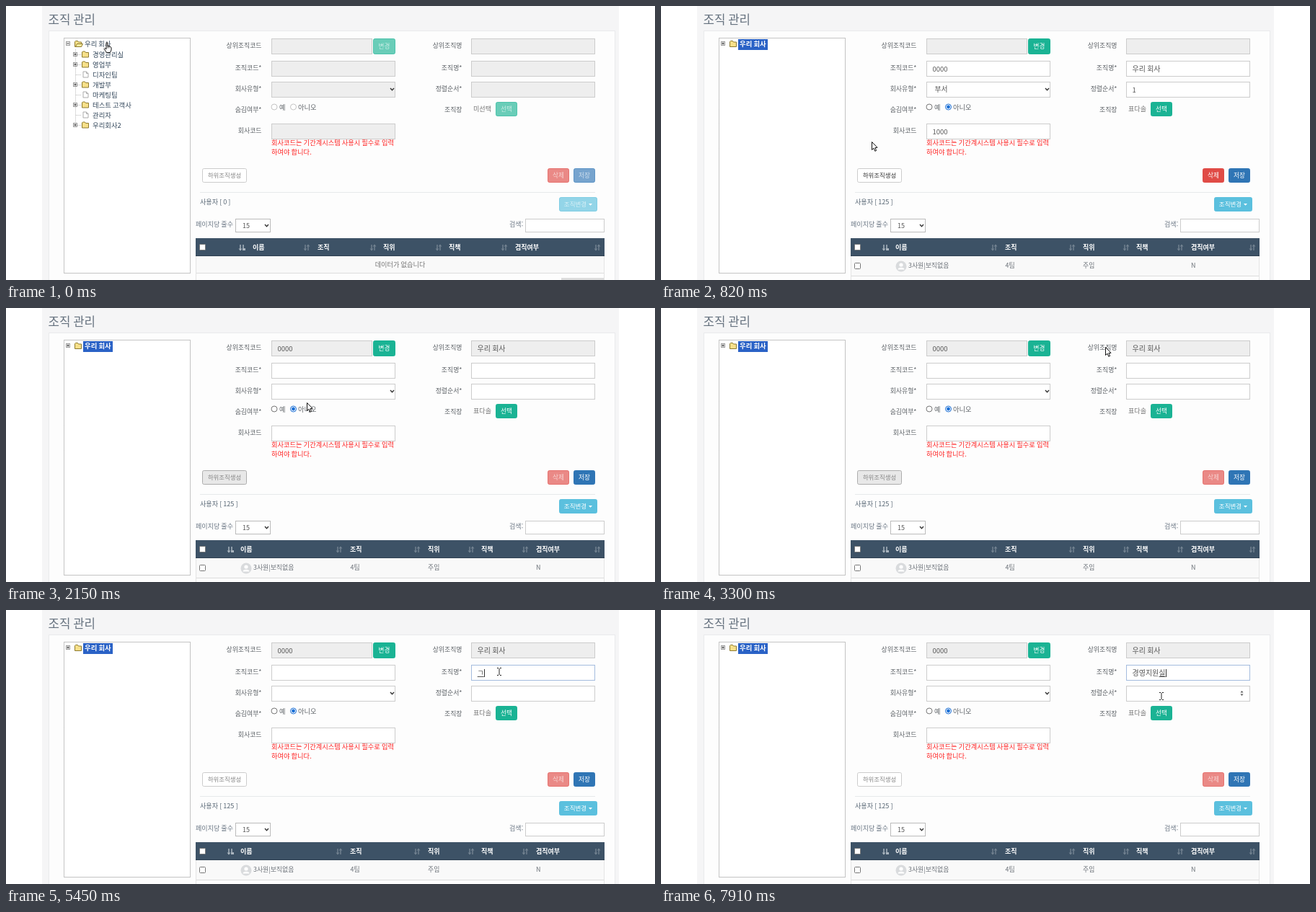
These frames come from a looping animation (900 px wide and 380 px high, 8000 ms). An HTML page with a canvas:

```html
<!DOCTYPE html>
<html lang="ko">
<head>
<meta charset="utf-8">
<title>조직 관리</title>
<style>
  html, body { margin: 0; width: 100%; height: 100%; overflow: hidden; background: #fff; }
  canvas { display: block; }
</style>
</head>
<body>
<canvas id="stage" width="900" height="380"></canvas>
<script>
const ctx = document.getElementById('stage').getContext('2d');
const LOOP = 8000;
const FONT = '"Noto Sans CJK KR", "Noto Sans CJK", "Noto Sans", sans-serif';
const LEADER = '표다솔';

// Event times in ms
const SELECT = 70, LOADED = 200, RAW = 270, READY = 480;
const NEW = 1560, BLUR = 3710, FOCUS = 4170, SORT_HOVER = 7720;

const path = [
  [0, 140, 51], [480, 140, 51], [800, 292, 188], [850, 292, 188],
  [1090, 302, 246], [1220, 302, 246], [1290, 303, 235], [1960, 303, 235],
  [2150, 417, 131], [2430, 438, 82], [2830, 438, 82], [3200, 570, 58],
  [3500, 706, 47], [3640, 704, 54], [4170, 684, 85], [7510, 684, 85], [7880, 694, 119]
];
const typing = [
  [5450, 'ㄱ'], [5650, '겨'], [5720, '경'], [5850, '경ㅇ'], [5910, '경여'],
  [6050, '경영'], [6180, '경영ㅈ'], [6380, '경영지'], [6470, '경영징'],
  [6560, '경영지우'], [6640, '경영지워'], [6710, '경영지원'], [6840, '경영지원시'], [7380, '경영지원실']
];

function fill(x, y, w, h, color) {
  ctx.fillStyle = color;
  ctx.fillRect(x, y, w, h);
}

function frame(x, y, w, h, bg, border) {
  fill(x, y, w, h, bg);
  ctx.strokeStyle = border;
  ctx.lineWidth = 1;
  ctx.strokeRect(x + 0.5, y + 0.5, w - 1, h - 1);
}

// Text placed by its vertical centre
function text(s, x, y, size = 9, color = '#666', weight = 400, align = 'left') {
  ctx.font = `${weight} ${size}px ${FONT}`;
  ctx.textAlign = align;
  ctx.fillStyle = color;
  ctx.fillText(s, x, y + size * 0.37);
}

function line(points, color, width = 1) {
  ctx.strokeStyle = color;
  ctx.lineWidth = width;
  ctx.beginPath();
  points.forEach(([x, y]) => ctx.lineTo(x, y));
  ctx.stroke();
}

function shape(points, bg, border) {
  ctx.beginPath();
  points.forEach(([x, y]) => ctx.lineTo(x, y));
  ctx.closePath();
  ctx.fillStyle = bg;
  ctx.fill();
  if (border) {
    ctx.strokeStyle = border;
    ctx.lineWidth = 1;
    ctx.stroke();
  }
}

function disc(x, y, r, bg, border) {
  ctx.beginPath();
  ctx.arc(x, y, r, 0, Math.PI * 2);
  ctx.fillStyle = bg;
  ctx.fill();
  if (border) {
    ctx.strokeStyle = border;
    ctx.lineWidth = 1;
    ctx.stroke();
  }
}

function button(label, x, y, w, h, bg, { dim = false, color = '#fff', border = bg, dx = 0, size = 8.6 } = {}) {
  ctx.save();
  if (dim) ctx.globalAlpha = 0.65;
  ctx.beginPath();
  ctx.roundRect(x + 0.5, y + 0.5, w - 1, h - 1, 2);
  ctx.fillStyle = bg;
  ctx.fill();
  ctx.strokeStyle = border;
  ctx.lineWidth = 1;
  ctx.stroke();
  text(label, x + w / 2 + dx, y + h / 2, size, color, 500, 'center');
  ctx.restore();
}

function input(x, y, w, value, off, border = '#ccc') {
  frame(x, y, w, 22, off ? '#eee' : '#fff', border);
  text(value, x + 8.5, y + 11, /^\d/.test(value) ? 9.5 : 10, '#555');
}

function chevron(x, y) {
  line([[x - 2.5, y - 1.5], [x, y + 1.3], [x + 2.5, y - 1.5]], '#333', 1.4);
}

function radio(x, y, on, off) {
  disc(x, y, 4, '#fff', on ? '#1a6fd6' : off ? '#c4c4c4' : '#777');
  if (on) disc(x, y, 2.4, '#1a6fd6');
}

function checkbox(x, y) {
  ctx.beginPath();
  ctx.roundRect(x - 3.5, y - 3.5, 8, 8, 1);
  ctx.fillStyle = '#fff';
  ctx.fill();
  ctx.strokeStyle = '#777';
  ctx.lineWidth = 1;
  ctx.stroke();
}

function expander(x, y, plus) {
  frame(x - 3, y - 3, 6, 6, '#fff', '#999');
  fill(x - 1.5, y - 0.5, 3, 1, '#222');
  if (plus) fill(x - 0.5, y - 1.5, 1, 3, '#222');
}

function folder(x, y, open) {
  shape([[x, y + 4], [x, y - 3], [x + 1, y - 4], [x + 4, y - 4], [x + 5, y - 2.5], [x + 9, y - 2.5], [x + 9, y + 4]], '#f7e08a', '#8d7a2f');
  if (open) shape([[x + 1, y + 4], [x + 3, y], [x + 11, y], [x + 9, y + 4]], '#fff0a0', '#8d7a2f');
}

function doc(x, y) {
  shape([[x, y - 4], [x + 4.5, y - 4], [x + 7, y - 1.5], [x + 7, y + 4], [x, y + 4]], '#fff', '#aaa');
  line([[x + 4.5, y - 4], [x + 4.5, y - 1.5], [x + 7, y - 1.5]], '#aaa');
}

function tree(t) {
  frame(80, 44, 176, 327, '#fff', '#fff');
  ctx.setLineDash([1, 1]);
  ctx.strokeStyle = '#888';
  ctx.strokeRect(80.5, 44.5, 175, 326);
  ctx.setLineDash([]);

  const closed = t >= LOADED, picked = t >= SELECT;
  expander(86, 52, closed);
  folder(95.5, 52.5, !closed);
  if (picked) fill(107, 46, 41, 15, '#2a62c6');
  text('우리 회사', 109, 53, 9.4, picked ? '#fff' : '#33475b', picked ? 700 : 500);
  if (closed) return;

  ctx.setLineDash([1, 1]);
  line([[96.5, 60], [96.5, 165]], '#bbb');
  ctx.setLineDash([]);
  ['경영관리실', '영업부', '-디자인팀', '개발부', '-마케팅팀', '테스트 고객사', '-관리자', '우리회사2'].forEach((item, i) => {
    const y = Math.round(66.5 + i * 14.07), leaf = item[0] === '-';
    ctx.setLineDash([1, 1]);
    line([[97, y + 0.5], [104, y + 0.5]], '#bbb');
    ctx.setLineDash([]);
    if (leaf) doc(107, y);
    else {
      expander(96, y, true);
      folder(105.5, y);
    }
    text(item.replace('-', ''), 120, y + 0.5, 9.4, '#33475b', 500);
  });
}

function nameField(t) {
  const focus = Math.min(1, Math.max(0, (t - FOCUS) / 150));
  const border = `rgb(${204 - focus * 40},${204 - focus * 16},${204 + focus * 18})`;
  const typed = typing.filter(k => t >= k[0]).pop();
  input(645, 76, 172, t >= LOADED && t < NEW ? '우리 회사' : '', t < LOADED, border);
  if (typed) {
    const end = 653.5 + typed[1].length * 9.2;
    text(typed[1], 653.5, 87, 10, '#555');
    fill(end - 9, 92, 9, 1, '#555');
    fill(Math.round(end), 82, 1, 11, '#333');
  } else if (t >= FOCUS && !(t >= 4780 && t < 5190)) {
    fill(653, 81, 1, 11, '#333');
  }
}

function form(t, pos) {
  const off = t < LOADED, fresh = t >= NEW;
  const val = s => off || fresh ? '' : s;
  const parent = s => fresh ? s : '';

  [['상위조직코드', 55], ['조직코드*', 86], ['회사유형*', 115], ['숨김여부*', 143.5], ['회사코드', 173]]
    .forEach(([s, y]) => text(s, 354.5, y, 8.9, '#5c6166', 500, 'right'));
  [['상위조직명', 55], ['조직명*', 86], ['정렬순서*', 115], ['조직장', 143.5]]
    .forEach(([s, y]) => text(s, 632.5, y, 8.9, '#5c6166', 500, 'right'));

  input(368, 45, 140, parent('0000'), true);
  button('변경', 509, 45, 31, 22, '#1ab394', { dim: off });
  input(368, 76, 172, val('0000'), off);
  input(368, 105, 172, '', off);
  text(val('부서'), 379.5, 115.5, 9.8, '#555');
  chevron(535.5, 115.5);
  radio(372, 140, false, off);
  text('예', 379, 140.5, 9.2, '#5c6166', 500);
  radio(398.5, 140, !off, off);
  text('아니오', 405, 140.5, 9.2, '#5c6166', 500);
  input(368, 163, 172, val('1000'), off);
  text('회사코드는 기간계시스템 사용시 필수로 입력', 368, 190, 9.25, '#f22');
  text('하여야 합니다.', 368, 203, 9.25, '#f22');

  input(645, 45, 172, parent('우리 회사'), true);
  nameField(t);
  input(645, 105, 172, val('1'), off);
  if (t >= SORT_HOVER) {
    shape([[803.5, 114.5], [805.5, 112], [807.5, 114.5]], '#555');
    shape([[803.5, 116.5], [805.5, 119], [807.5, 116.5]], '#555');
  }
  text(off ? '미선택' : LEADER, 648, 142.5, 9.1, '#777');
  button('선택', 679, 133, 30, 20, '#1ab394', { dim: off });

  const hover = inside(pos, 272, 225, 62, 20);
  const active = fresh ? t < BLUR : hover;
  button('하위조직생성', 272, 225, 62, 20, active ? '#e8e8e8' : '#fff', {
    color: off || fresh ? '#858585' : '#333', border: active ? '#adadad' : '#ccc', size: 8.4
  });
  button('삭제', 751, 225, 30, 20, '#e04b46', { dim: off || fresh });
  button('저장', 787, 225, 30, 20, '#2f75b5', { dim: off });
}

function sorter(x, y, active) {
  const color = active ? '#a9b4be' : '#71808f';
  line([[x - 2, y - 4], [x - 2, y + 4]], color, 1.5);
  line([[x + 2, y - 4], [x + 2, y + 4]], color, 1.5);
  shape([[x - 4.5, y + 1.5], [x + 0.5, y + 1.5], [x - 2, y + 4.5]], color);
  if (active) fill(x + 1, y + 1, 4, 3, color);
  else shape([[x - 0.5, y - 1.5], [x + 4.5, y - 1.5], [x + 2, y - 4.5]], color);
}

function header(y, cols, icons) {
  fill(263, y, 567, 25, '#3d5266');
  fill(263, y + 24, 567, 1, '#2f4152');
  checkbox(272, y + 12);
  ['이름', '조직', '직위', '직책', '겸직여부'].forEach((s, i) => text(s, cols[i], y + 13, 9, '#fff', 700));
  icons.forEach((x, i) => sorter(x, y + 13, i === 0));
}

function row(y, bg, cols, cells) {
  fill(263, y, 567, 27, bg);
  fill(263, y + 26, 567, 1, '#ddd');
  checkbox(272, y + 13);
  cells.forEach((s, i) => text(s, cols[i], y + 12.5, 8.9, '#6b7178'));
}

function table(t) {
  const empty = t < RAW, raw = !empty && t < READY;
  fill(269, 258, 548, 1, '#e7e9eb');
  text(`사용자 [ ${empty ? 0 : 125} ]`, 269, 271.5, 9.1, '#566573', 500);
  button('조직변경', 767, 265, 53, 20, '#5bc0de', { dim: t < LOADED, dx: -4, size: 8.5 });
  shape([[808, 274], [813, 274], [810.5, 276.8]], '#fff');

  const first = ['1', '', '', '', ''];
  first.splice(0, 5, '3사원|보직없음', '4팀', '주임', '', 'N');
  if (raw) {
    const cols = [322, 470, 589, 670, 752];
    header(299, [304, ...cols.slice(1)], []);
    row(324, '#f9f9f9', cols, first);
    row(351, '#fff', cols, ['5차장|그룹장', '4팀', '과장', '파트장', 'N']);
    fill(263, 378, 567, 2, '#f9f9f9');
    return;
  }

  text('페이지당 줄수', 263, 303, 9.05, '#6b7785');
  frame(318, 295, 49, 19, '#fff', '#bbb');
  text('15', 328, 304.5, 9, '#555');
  chevron(361.5, 304.5);
  text('검색:', 698, 303, 9.05, '#6b7785');
  frame(720, 295, 110, 19, '#fff', '#ccc');

  if (empty) {
    header(322, [342, 432, 523, 614, 706], [327, 417, 509, 600, 691, 820]);
    fill(263, 347, 567, 24, '#f9f9f9');
    fill(263, 370, 567, 1, '#ddd');
    text('데이터가 없습니다', 546.5, 358.5, 9.2, '#777', 400, 'center');
    fill(770, 377, 60, 3, '#ddd');
  } else {
    const cols = [343, 477.5, 585, 659, 735];
    header(322, [325, 477, 585, 659, 735], [311, 462, 570, 645, 720, 820]);
    row(347, '#f9f9f9', cols, first);
    fill(263, 373, 567, 1, '#f9f9f9');
    fill(263, 374, 567, 1, '#ddd');
    disc(333, 361, 7.5, '#d9dbdd');
    disc(333, 359, 2.6, '#fff');
    ctx.beginPath();
    ctx.ellipse(333, 365.5, 4.5, 2.7, 0, Math.PI, 0);
    ctx.fill();
  }
  fill(263, 347, 1, 33, '#e4e4e4');
  fill(829, 347, 1, 33, '#e4e4e4');
}

function inside([px, py], x, y, w, h) {
  return px >= x && px <= x + w && py >= y && py <= y + h;
}

function cursorAt(t) {
  const i = path.findIndex(k => k[0] > t);
  if (i < 0) return path[path.length - 1].slice(1);
  const [t0, x0, y0] = path[i - 1], [t1, x1, y1] = path[i];
  const p = (t - t0) / (t1 - t0);
  return [x0 + (x1 - x0) * p, y0 + (y1 - y0) * p];
}

function cursor(t, pos) {
  const [x, y] = pos.map(Math.round);
  const at = pts => pts.map(([a, b]) => [x + a, y + b]);
  const overText = inside(pos, 368, 76, 172, 22) || [45, 76, 105].some(top => inside(pos, 645, top, 172, 22));
  const overLink = inside(pos, 108, 46, 40, 15) || (t < NEW && inside(pos, 272, 225, 62, 20));

  if ((t >= NEW && t < 1690) || (t >= FOCUS && t < 4380)) disc(x - 1, y, 8, 'rgba(255,236,40,.75)');
  if (overText) {
    fill(x - 0.5, y - 4, 1, 9, '#222');
    fill(x - 3, y - 5, 2, 1, '#222');
    fill(x + 1, y - 5, 2, 1, '#222');
    fill(x - 3, y + 5, 2, 1, '#222');
    fill(x + 1, y + 5, 2, 1, '#222');
  } else if (overLink) {
    shape(at([[-1, 0], [1, 0], [1, 5], [3, 4.5], [5, 5.5], [6, 7], [6, 10], [4.5, 13.5], [-0.5, 13.5], [-4, 8.5], [-3, 7.5], [-1, 9]]), '#fff', '#111');
    line(at([[3, 5], [3, 7.5]]), '#111', 0.7);
    line(at([[1, 5], [1, 7.5]]), '#111', 0.7);
  } else {
    shape(at([[0.5, 0.5], [0.5, 11.5], [3, 9.2], [4.8, 13.3], [6.6, 12.5], [4.9, 8.6], [8, 8.3]]), '#fff', '#111');
  }
}

function draw(t) {
  const pos = cursorAt(t);
  fill(0, 0, 900, 380, '#fff');
  fill(50, 0, 800, 380, '#f5f5f6');
  frame(59, 34, 786, 350, '#fdfdfd', '#e9eaec');
  text('조직 관리', 58.5, 18.5, 16.8, '#66727f', 300);
  tree(t);
  form(t, pos);
  table(t);
  cursor(t, pos);
}

function tick() {
  draw(performance.now() % LOOP);
  requestAnimationFrame(tick);
}
tick();
</script>
</body>
</html>
```
